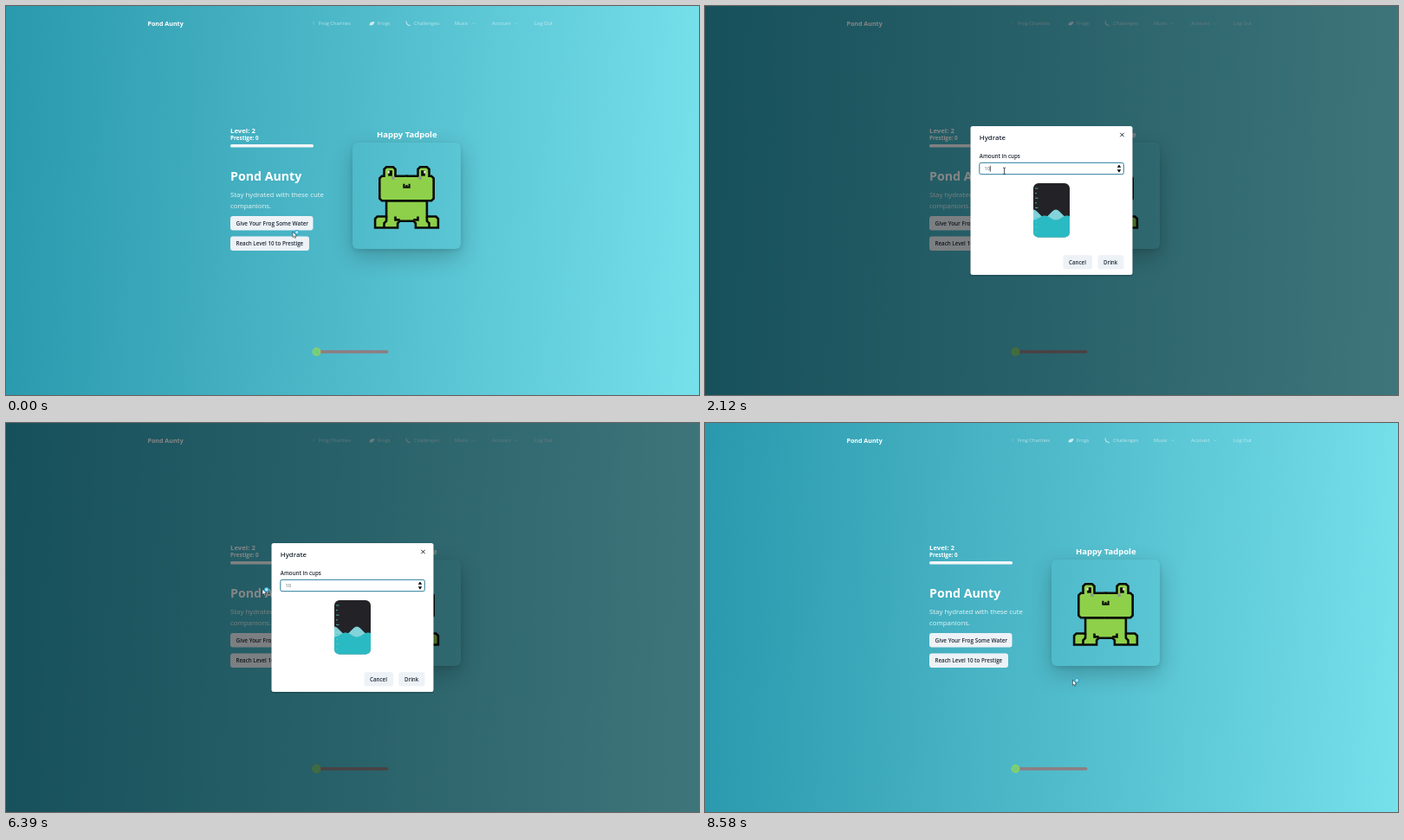
An HTML page that plays this animation: 800 px wide and 450 px high, repeating every 8.61 s.

```html
<!DOCTYPE html>
<html lang="en">
<head>
<meta charset="utf-8">
<title>Pond Aunty</title>
<style>
  html, body { margin: 0; width: 100%; height: 100%; overflow: hidden; }
  body { position: relative; background: linear-gradient(92deg, #2a99ad, #4fbaca 50%, #76e0eb); }
  svg { position: absolute; left: 0; top: 0; width: 800px; height: 450px; }
  .card {
    position: absolute; left: 400px; top: 158px; width: 125px; height: 123px;
    border-radius: 6px; box-shadow: 0 9px 26px rgba(0, 0, 0, .22), 0 2px 5px rgba(0, 0, 0, .1);
  }
  text { font-family: "Open Sans", "Noto Sans", sans-serif; white-space: pre; }
  .bold { font-weight: 700; fill: #fff; }
  .semi { font-weight: 600; fill: #1e2733; }
  .nav { font-size: 5.75px; fill: #fff; fill-opacity: .62; }
</style>
</head>
<body>
<div class="card"></div>
<svg viewBox="0 0 800 450">
  <defs>
    <clipPath id="glass"><rect x="379" y="205" width="42" height="62.5" rx="6"/></clipPath>
    <g id="half" stroke="#0b0d08" fill="#8ed04a">
      <path d="M.5 15H-9V22H-13L-14 23V27H-4V25L-3 24H.5"/>
      <path d="M-9 22V24L-10 25V27M-5 22V23.500H-3" fill="none"/>
      <path d="M.5 4H-5V1L-6 0H-9L-10 1V4H-11L-12 5V14L-11 15H.5"/>
      <path d="M-7.300 1.500V4" stroke-width="1.800"/>
      <path d="M-8 1.600V2.800" stroke="#e8f2e0" stroke-width=".8"/>
      <path d="M-6 4.200V5.600" stroke="#8f9a86" stroke-width="1.400"/>
    </g>
  </defs>

  <g id="page">
    <text class="bold" x="163.500" y="22.600" font-size="7.1">Pond Aunty</text>
    <g class="nav">
      <text x="361" y="22">Frog Charities</text>
      <text x="429" y="22">Frogs</text>
      <text x="471" y="22">Challenges</text>
      <text x="518" y="22">Music</text>
      <text x="561" y="22">Account</text>
      <text x="610" y="22">Log Out</text>
    </g>
    <g fill="none" stroke="#fff" stroke-opacity=".3" stroke-width=".7">
      <path d="M355 18v4M538 19l2 2 2-2M587 19l2 2 2-2"/>
      <path d="M462 17.500q0 5 5 5" stroke-width="1.1" stroke-opacity=".6"/>
    </g>
    <path d="M419.500 22q0-4 6-4q-.5 4.500-5 4.500z" fill="#fff" fill-opacity=".7"/>

    <text class="bold" x="259" y="146.500" font-size="7.75">Level: 2</text>
    <text class="bold" x="259" y="155.200" font-size="6.35">Prestige: 0</text>
    <rect x="259" y="160" width="96" height="3.500" rx="1.500" fill="#f3f6f8"/>
    <text class="bold" x="259" y="202" font-size="14.2">Pond Aunty</text>
    <g font-size="7.85" fill="#fff" fill-opacity=".88">
      <text x="259" y="221">Stay hydrated with these cute</text>
      <text x="259" y="233.500">companions.</text>
    </g>
    <rect x="259" y="243" width="95.500" height="16.500" rx="3" fill="#edf2f7"/>
    <text class="semi" x="265.500" y="254" font-size="6.4">Give Your Frog Some Water</text>
    <rect x="259" y="266.500" width="91" height="16.500" rx="3" fill="#edf2f7"/>
    <text class="semi" x="265.500" y="277" font-size="6.22">Reach Level 10 to Prestige</text>

    <text class="bold" x="428" y="152" font-size="9.5">Happy Tadpole</text>
    <g transform="translate(462.500 186.300) scale(2.6)">
      <use href="#half"/>
      <use href="#half" transform="scale(-1 1)"/>
      <path d="M-1.200 7.500V9H1.200V7.500M0 8V9" fill="none" stroke="#0b0d08" stroke-width=".8"/>
    </g>

    <rect x="358" y="398.200" width="83.500" height="3.600" rx="1.800" fill="#8f7c80"/>
    <circle cx="358.500" cy="400" r="4.400" fill="#74cf78" stroke="#a2d355"/>
  </g>

  <rect id="shade" width="800" height="450" opacity="0"/>

  <g id="modal" opacity="0">
    <rect x="305.500" y="141" width="189" height="172" rx="4" fill="#000" opacity=".12"/>
    <rect x="306.500" y="139" width="187" height="172" rx="2.500" fill="#fff"/>
    <text class="semi" x="316.800" y="155" font-size="7.8">Hydrate</text>
    <path d="M479.300 146.800l4.400 4.400m0-4.400l-4.400 4.400" stroke="#1e2733"/>
    <text class="semi" x="316.800" y="175.500" font-size="6.23">Amount in cups</text>
    <rect id="field" x="316.800" y="181.300" width="166.500" height="13.400" rx="2" fill="#fff"/>
    <text id="value" x="322.500" y="190.300" font-size="5.6" fill="#56616b"></text>
    <path id="caret" d="M0 184.800v6.800" stroke="#222" stroke-width=".8"/>
    <path d="M475.800 186.800l2.200-3.400 2.200 3.400zM475.800 189.300l2.200 3.400 2.200-3.400z"/>
    <g clip-path="url(#glass)">
      <rect x="379" y="205" width="42" height="63" fill="#232327"/>
      <path id="back" fill="#83d3da"/>
      <path id="front" fill="#2abac3"/>
      <path id="ticks" stroke="#5fc3bb" stroke-width=".8"/>
      <g id="bubbles" fill="#8fdce0"><circle cx="397" cy="248" r=".8"/><circle cx="411" cy="254" r=".8"/></g>
    </g>
    <rect id="cancel" x="413.500" y="288.300" width="33.500" height="16.300" rx="2.500"/>
    <text class="semi" x="420" y="298.700" font-size="6.24">Cancel</text>
    <rect x="453.500" y="288.300" width="30" height="16.300" rx="2.500" fill="#edf2f7"/>
    <text class="semi" x="460" y="298.700" font-size="6.15">Drink</text>
  </g>

  <g id="cursor" fill="#fff" stroke="#26323a" stroke-width=".6" stroke-linejoin="round">
    <g id="arrow">
      <path d="M0 0V6.600L1.500 5.300 2.500 7.500 3.600 7 2.600 4.900H4.600Z"/>
      <circle cx="4.800" cy=".8" r="2.300" fill="#b4e6f3" stroke="#2fa3cb" stroke-width="1.200"/>
    </g>
    <path id="hand" d="M-.9 .6Q0-.6 .9 .6V3.200Q3 3 4.300 4.300V6.600L3.400 9H-1.300L-3.600 5.800Q-3.200 4.600-1.800 5.600L-.9 6.200Z"/>
    <path id="beam" fill="none" stroke-width=".8" d="M-1.500 0Q0 0 0 1Q0 0 1.500 0M0 1V6.500M-1.500 7.500Q0 7.500 0 6.500Q0 7.500 1.500 7.500"/>
  </g>
</svg>
<script>
const LOOP = 8610;
const $ = id => document.getElementById(id);
const set = (id, attrs) => Object.entries(attrs).forEach(([k, v]) => $(id).setAttribute(k, v));
const show = (id, on) => set(id, { visibility: on ? 'inherit' : 'hidden' });
const clamp = v => Math.min(1, Math.max(0, v));
const ease = v => v * v * (3 - 2 * v);

// Each stop is [time, value, ...]; values ease from one stop to the next.
function track(stops, t) {
  let i = 0;
  while (i < stops.length - 2 && t >= stops[i + 1][0]) i++;
  const [a, b] = [stops[i], stops[i + 1]];
  const k = ease(clamp((t - a[0]) / (b[0] - a[0])));
  return a.slice(1).map((v, j) => v + (b[j + 1] - v) * k);
}
// The value of the last step that has begun.
const step = (steps, t) => steps.filter(s => s[0] <= t).pop()[1];

const pointer = [
  [0, 331, 261], [250, 331, 261], [560, 317.5, 248], [700, 317.5, 248], [1500, 345.5, 187],
  [3900, 345.5, 187], [4400, 388, 198.5], [4500, 388, 198.5], [5180, 296, 192],
  [6450, 296, 192], [7200, 434, 298.5], [7700, 434, 298.5], [8390, 424.5, 297]
];
const shapes = [[0, 'arrow'], [1350, 'beam'], [4150, 'hand'], [4800, 'arrow'], [7050, 'hand'], [7560, 'arrow']];
const level = [[620, 262], [1500, 240], [6620, 240], [7300, 216.5]];
const typed = [[0, '10'], [2900, '1'], [3100, ''], [3450, '2'], [4950, '10']];

function wave(mid, amp) {
  let d = 'M379 270';
  for (let x = 379; x <= 421; x++)
    d += `L${x} ${mid - amp * Math.cos((x - 405) * Math.PI / 13)}`;
  return d + 'V270Z';
}

let marks = '';
for (let i = 0; i < 10; i++) marks += `M381 ${211 + i * 5.6}h${i % 2 ? 2 : 3.5}`;
set('ticks', { d: marks });

function draw(now) {
  const t = now % LOOP;
  const rise = clamp((t - 520) / 180), fall = clamp((t - 7510) / 180);
  const open = (1 - (1 - rise) ** 2) * (1 - fall * fall);
  set('shade', { opacity: .48 * open });
  set('modal', {
    opacity: open,
    transform: `translate(400 225) scale(${.94 + .06 * open}) translate(-400 -225)`
  });

  const [mid] = track(level, t);
  set('back', { d: wave(mid, 4.5) });
  set('front', { d: wave(mid + 5 + (240 - mid) * .12, -2.5) });
  show('bubbles', t > 7000);

  const focus = t > 1650, text = step(typed, t);
  $('value').textContent = text;
  set('field', { stroke: focus ? '#2b7c9c' : '#e2e8f0' });
  set('caret', { transform: `translate(${322.9 + text.length * 3.2} 0)` });
  show('caret', focus && (t < 4900 || t > 6750));
  set('cancel', { fill: t > 7150 && t < 7600 ? '#dfe5eb' : '#edf2f7' });

  const [x, y] = track(pointer, t), shape = step(shapes, t);
  set('cursor', { transform: `translate(${x} ${y})` });
  for (const id of ['arrow', 'hand', 'beam']) show(id, id === shape);
  requestAnimationFrame(draw);
}
requestAnimationFrame(draw);
</script>
</body>
</html>
```
